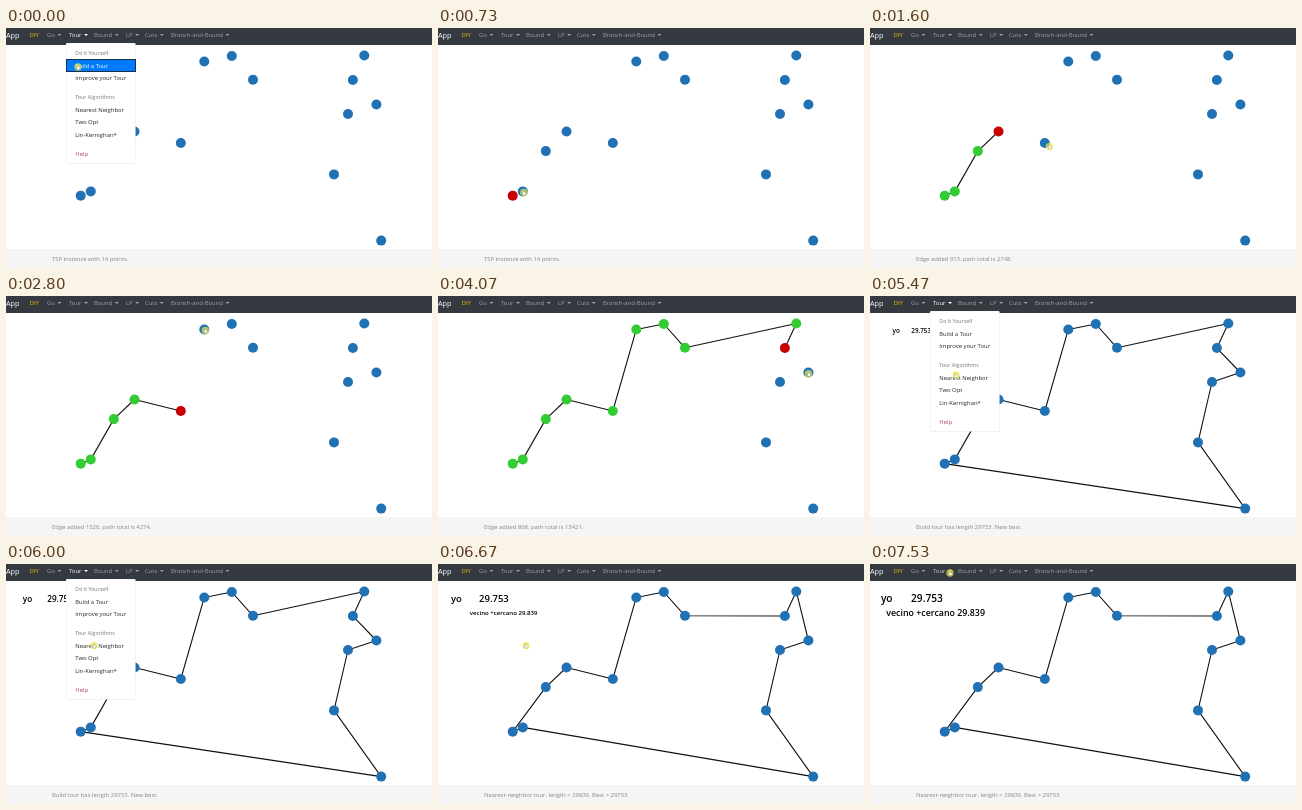
Animation of 426 by 240 pixels, one loop 7600 ms. Source, as an HTML page:

```html
<!DOCTYPE html>
<html lang="en">
<head>
<meta charset="utf-8">
<title>Tour building</title>
<style>
  html, body { margin: 0; width: 100%; height: 100%; overflow: hidden; background: #fff; }
  svg { display: block; width: 100vw; height: 100vh; font-family: "Open Sans", "Noto Sans", sans-serif; font-size: 5.9px; }
</style>
</head>
<body>
<svg id="stage" viewBox="0 0 426 240"></svg>
<script>
const LOOP = 7600;
const UNITS_PER_PIXEL = 32;
const BLUE = '#2171b5', GREEN = '#32cd32', RED = '#c80000', DIM = '#a0a3a6';
const points = [
  [74.7, 167.65], [84.8, 163.38], [107.8, 123.11], [128.53, 103.5], [174.81, 115], [198.3, 33.45], [225.8, 28],
  [247, 51.8], [358.3, 27.45], [346.87, 52.05], [370.4, 76.5], [342, 86], [328, 146.4], [375.2, 212.6]
];

const every = (step, from, count) => Array.from({ length: count }, (_, i) => from + i * step);
const clickTimes = [...every(240, 600, 4), 2200, ...every(200, 2900, 3), ...every(250, 3600, 6)];
const buildClick = 100, tourDone = 4950, menuOpen = 5330, nearestClick = 6030;

// The pointer reaches each point shortly before its click: [arrival, x, y]
const pointerStops = [
  [0, 72, 39],
  ...points.map(([x, y], i) => [clickTimes[i] - 100, x + 1, y + 1]),
  [1600, 179.5, 118.5], [menuOpen, 70, 9], [menuOpen + 140, 86, 79], [5900, 88, 81.5], [7400, 80, 9]
].sort((a, b) => a[0] - b[0]);

const distance = (i, j) => Math.hypot(points[i][0] - points[j][0], points[i][1] - points[j][1]);
const edgeLength = i => Math.round(UNITS_PER_PIXEL * distance(i, i + 1));

function nearestNeighborTour(first) {
  const tour = [first], left = new Set(points.keys());
  left.delete(first);
  while (left.size) {
    const last = tour.at(-1);
    const next = [...left].reduce((a, b) => distance(last, b) < distance(last, a) ? b : a);
    tour.push(next);
    left.delete(next);
  }
  return tour;
}
const nearestOrder = nearestNeighborTour(1);

const stage = document.getElementById('stage');

function add(tag, attrs, parent = stage, text = '') {
  const el = document.createElementNS('http://www.w3.org/2000/svg', tag);
  for (const name in attrs) el.setAttribute(name, attrs[name]);
  el.textContent = text;
  parent.appendChild(el);
  return el;
}
const label = (x, y, text, attrs = {}, parent = stage) => add('text', { x, y, ...attrs }, parent, text);
const show = (el, visible) => el.setAttribute('visibility', visible ? 'visible' : 'hidden');

add('rect', { width: 426, height: 240, fill: '#fff' });
const route = add('path', { fill: 'none', stroke: '#111', 'stroke-width': 1.1, 'stroke-linejoin': 'round' });
const dots = points.map(([cx, cy]) => add('circle', { cx, cy, r: 5 }));

add('rect', { y: 221, width: 426, height: 19, fill: '#f5f5f5' });
const status = label(46, 233.2, '', { fill: '#858585' });

add('rect', { width: 426, height: 17, fill: '#343a40' });
label(0, 9.7, 'App', { fill: '#fff', 'font-size': 7.3, 'font-weight': 500 });
label(23.5, 9.2, 'DIY', { fill: '#ffc107', 'font-weight': 500 });

function addNavItem(x, name) {
  const item = add('g', { fill: DIM });
  const caretX = x + label(x, 9.2, name, {}, item).getComputedTextLength() + 2.6;
  add('path', { d: `M${caretX} 6h4l-2 2z` }, item);
  return item;
}
addNavItem(41, 'Go');
const tourItem = addNavItem(63, 'Tour');
addNavItem(88, 'Bound');
addNavItem(120, 'LP');
addNavItem(139, 'Cuts');
addNavItem(165, 'Branch-and-Bound');

const addCaption = (x, y) => ({ x, y, el: add('g', { 'font-size': 10.6, 'font-weight': 600 }) });
const ownScore = addCaption(41.8, 34.6);
label(-32.2, 3.8, 'yo', {}, ownScore.el);
label(-0.8, 3.8, '29.753', {}, ownScore.el);
const nearestScore = addCaption(65.6, 49);
label(0, 3.6, 'vecino +cercano 29.839', { 'text-anchor': 'middle' }, nearestScore.el);

const menu = add('g', { fill: '#212529' });
add('rect', { x: 60, y: 15, width: 69.6, height: 120.5, rx: 1.2, fill: '#fff', stroke: '#000', 'stroke-opacity': .1, 'stroke-width': .5 }, menu);
const highlight = add('rect', { x: 60.5, y: 31.5, width: 69, height: 12, fill: '#007bff', stroke: '#14304c' }, menu);
const menuText = (y, text, attrs) => label(69.3, y, text, attrs, menu);
const heading = { fill: '#6c757d', 'font-size': 5.3 };
menuText(26.5, 'Do It Yourself', heading);
const buildItem = menuText(39.7, 'Build a Tour');
menuText(52.2, 'Improve your Tour');
menuText(71, 'Tour Algorithms', heading);
menuText(84, 'Nearest Neighbor');
menuText(96.2, 'Two Opt');
menuText(108.6, 'Lin-Kernighan*');
menuText(127.6, 'Help', { fill: '#b04a55' });

const pointer = add('g', {});
add('circle', { r: 3.7, fill: '#f2ee38', 'fill-opacity': .7 }, pointer);
add('path', { d: 'M-1 -2v3l-.8-.5 1.2 2h2.2l.6-2.5-2-.5v-1.5z', fill: '#fff', stroke: '#777', 'stroke-width': .35 }, pointer);

// Rests at a stop, then travels during the last 200 ms before the next arrival.
function pointerAt(t) {
  const next = pointerStops.findIndex(stop => stop[0] > t);
  if (next < 0) return pointerStops.at(-1).slice(1);
  const [t0, x0, y0] = pointerStops[next - 1], [t1, x1, y1] = pointerStops[next];
  const travel = Math.min(200, t1 - t0);
  const u = Math.max(0, 1 - (t1 - t) / travel), k = u * u * (3 - 2 * u);
  return [x0 + (x1 - x0) * k, y0 + (y1 - y0) * k];
}

function routePath(order, closed) {
  return order.length ? 'M' + order.map(i => points[i].join(' ')).join('L') + (closed ? 'Z' : '') : '';
}

function statusText(t, clicked) {
  if (t >= nearestClick) return 'Nearest-neighbor tour, length = 29839. Best = 29753.';
  if (t >= tourDone) return 'Build tour has length 29753. New best.';
  if (clicked < 2) return 'TSP instance with 14 points.';
  const added = every(1, 0, clicked - 1).map(edgeLength);
  return `Edge added ${added.at(-1)}, path total is ${added.reduce((a, b) => a + b)}.`;
}

function drawCaption({ el, x, y }, age) {
  show(el, age >= 0);
  const scale = 1 - .59 * Math.exp(-Math.max(age, 0) / 900);
  el.setAttribute('transform', `translate(${x} ${y}) scale(${scale})`);
}

function draw(t) {
  const clicked = clickTimes.filter(time => time <= t).length;
  const done = t >= tourDone;
  const order = t >= nearestClick ? nearestOrder : every(1, 0, clicked);
  route.setAttribute('d', routePath(order, done));
  dots.forEach((dot, i) => {
    dot.setAttribute('fill', done || i >= clicked ? BLUE : i === clicked - 1 ? RED : GREEN);
  });
  status.textContent = statusText(t, clicked);

  const building = t < buildClick;
  const open = building || (t >= menuOpen && t < nearestClick);
  show(menu, open);
  highlight.setAttribute('opacity', building ? 1 : 0);
  buildItem.setAttribute('fill', building ? '#fff' : '#212529');
  tourItem.setAttribute('fill', open ? '#fff' : t > 7350 ? '#cfd1d3' : DIM);

  drawCaption(ownScore, t - 5130);
  drawCaption(nearestScore, t - 6380);
  pointer.setAttribute('transform', `translate(${pointerAt(t).join(' ')})`);
}

const start = performance.now();
function tick() {
  draw((performance.now() - start) % LOOP);
  requestAnimationFrame(tick);
}
tick();
</script>
</body>
</html>
```
